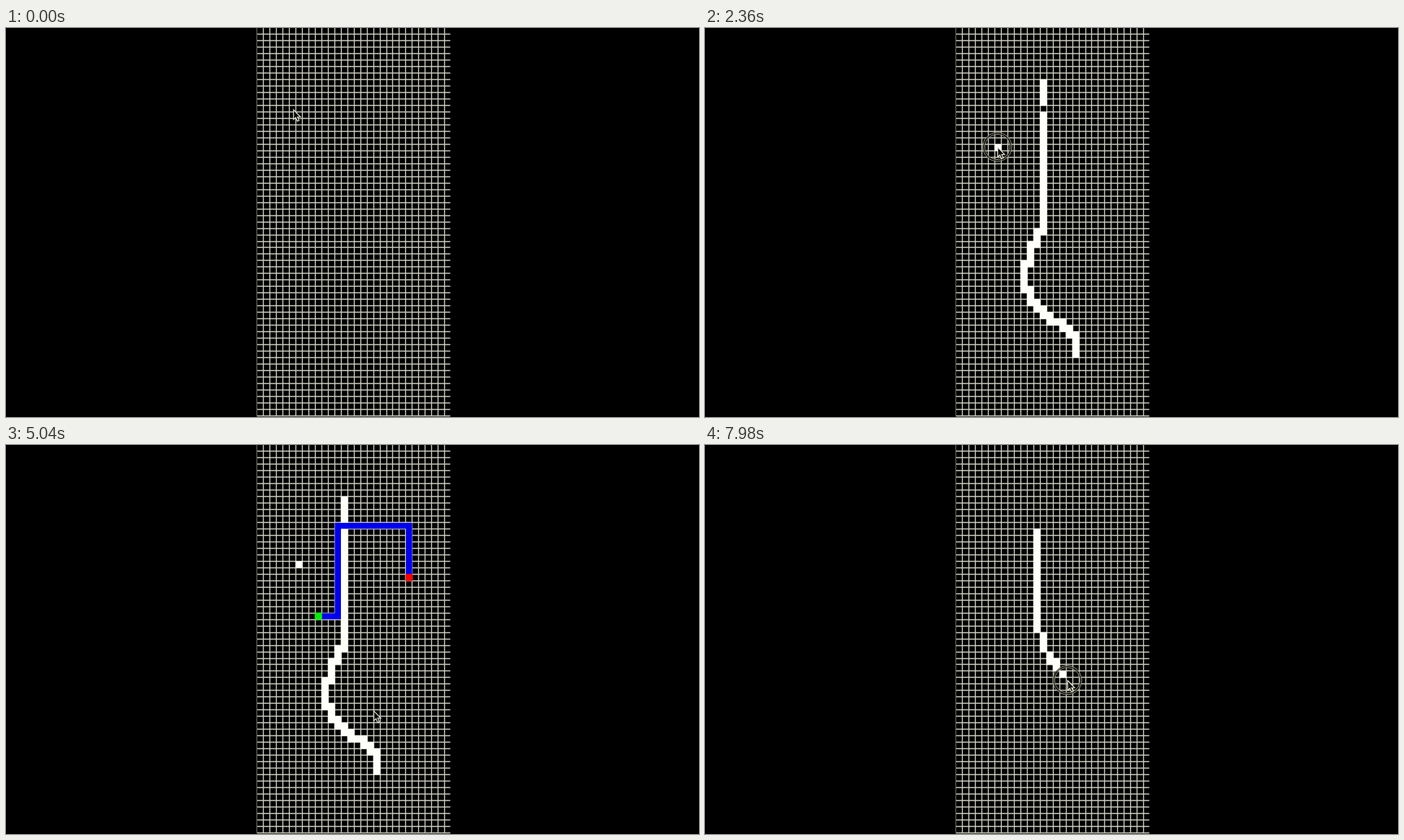
An HTML page with a canvas that plays this animation: 960x540 px, repeating every 8000 ms.

```html
<!DOCTYPE html>
<html lang="en">
<head>
<meta charset="utf-8">
<title>Grid path finder</title>
<style>
  html, body { margin: 0; width: 100%; height: 100%; overflow: hidden; background: #000; }
  canvas { display: block; width: 960px; height: 540px; }
</style>
</head>
<body>
<canvas id="stage" width="960" height="540"></canvas>
<script>
const ctx = document.getElementById('stage').getContext('2d');
const LOOP = 8000, PITCH = 8.97, LEFT = 347.6, RIGHT = 615.5, COLS = 30, ROWS = 60;
const WHITE = '#fffffa', GREEN = '#00f000', RED = '#ff0000', BLUE = '#0000f0';

// All positions below are in grid cells, all times in steps.
const STRAY_AT = 51, START_AT = 60, GOAL_AT = 77, ROUTE_AT = 88, CLEAR_AT = 145;
const CLICK = 2, INK_DELAY = 0.6;

const route = new Path2D('M10 26.5H12.5V12.5H23.5V20');
const arrow = new Path2D('M0 0V13.5L3 10.8L5.2 15.8L7.6 14.8L5.5 10H9.6Z');

const first = stroke(8.6, 32.1, `M13.5 8.3V12M13.5 13V30.9
  C12.5 32.2 10.7 36.6 10.4 38C10.5 39.5 12.6 44.2 15 45.3C17 46.2 18.5 47.3 18.5 50.9`);
const second = stroke(159, 172, 'M12.5 13.2V27.5L14 32L16 35L16.5 36.4H17.2');

const moves = [
  move(1, 8.6, 13.5, 8.3),
  first,
  move(35, 50, 6.4, 18.4),
  move(53, START_AT, 9.5, 26.4),
  move(62, 68, 16.2, 30.4),
  move(68, 76, 23.5, 20.5),
  move(81, 104, 18, 41.1),
  move(109, 127, 15.2, 33),
  move(CLEAR_AT, 159, 12.5, 13.2),
  second
];

function move(from, to, col, row) {
  return {
    from, to,
    at(k, [c, r]) {
      const ease = k * k * (3 - 2 * k);
      return [c + (col - c) * ease, r + (row - r) * ease];
    }
  };
}

// A drag along a path, with the cells it passes over in order.
function stroke(from, to, d) {
  const path = document.createElementNS('http://www.w3.org/2000/svg', 'path');
  path.setAttribute('d', d);
  const length = path.getTotalLength();
  const at = k => {
    const p = path.getPointAtLength(k * length);
    return [p.x, p.y];
  };
  const cells = new Map();
  for (let k = 0; k <= 1; k += 0.002) {
    const [col, row] = at(k).map(Math.floor);
    const key = col + ',' + row;
    if (!cells.has(key)) cells.set(key, { col, row, time: from + k * (to - from) + INK_DELAY });
  }
  return { from, to, at, cells: [...cells.values()] };
}

// Three quick steps, then a pause, in every 140 ms.
function stepAt(ms) {
  const shifted = ms + 20;
  return 3 * Math.floor(shifted / 140) + Math.min(2, Math.floor(shifted % 140 / 20));
}

function pointerAt(step) {
  let spot = [5.6, 12.6];
  for (const m of moves) {
    if (step < m.from) break;
    spot = m.at(Math.min(1, (step - m.from) / (m.to - m.from)), spot);
  }
  return spot;
}

function isPressed(step) {
  return [first, second].some(s => step >= s.from && step <= s.to + 1) ||
    [STRAY_AT, START_AT, GOAL_AT].some(t => step >= t && step < t + CLICK);
}

function drawGrid() {
  const lines = new Path2D();
  const snap = v => Math.floor(v) + 0.5;
  for (let c = 1; c < COLS; c++) {
    lines.moveTo(snap(LEFT + c * PITCH), 0);
    lines.lineTo(snap(LEFT + c * PITCH), 538.5);
  }
  for (let r = 1; r <= ROWS; r++) {
    lines.moveTo(LEFT, snap(r * PITCH));
    lines.lineTo(RIGHT, snap(r * PITCH));
  }
  ctx.strokeStyle = '#d0d0c2';
  ctx.lineWidth = 1.4;
  ctx.stroke(lines);
  ctx.fillStyle = '#70705c';
  ctx.fillRect(347, 0, 1, 539);
}

function fillCell(col, row, color) {
  ctx.fillStyle = color;
  ctx.fillRect(LEFT + col * PITCH - 0.4, row * PITCH - 0.4, PITCH + 0.8, PITCH + 0.8);
}

function drawInk(step, { cells }) {
  for (const { col, row, time } of cells) {
    if (step >= time) fillCell(col, row, WHITE);
  }
}

function drawRoute() {
  ctx.save();
  ctx.translate(LEFT, 0);
  ctx.scale(PITCH, PITCH);
  ctx.strokeStyle = BLUE;
  ctx.lineWidth = 0.94;
  ctx.stroke(route);
  ctx.restore();
}

function circle(radius, width, color) {
  ctx.beginPath();
  ctx.arc(0, 0, radius, 0, Math.PI * 2);
  ctx.lineWidth = width;
  ctx.strokeStyle = color;
  ctx.stroke();
}

function drawPointer(step) {
  const [col, row] = pointerAt(step);
  ctx.save();
  ctx.translate(LEFT + col * PITCH, row * PITCH);
  if (isPressed(step)) {
    circle(18.8, 3, 'rgba(0,0,0,.6)');
    circle(20, 1, '#a0a08c');
    circle(17.5, 1, '#a0a08c');
  }
  ctx.translate(0.5, 0.5);
  ctx.fillStyle = '#080808';
  ctx.fill(arrow);
  ctx.strokeStyle = '#e4e4d4';
  ctx.lineWidth = 1.2;
  ctx.stroke(arrow);
  ctx.restore();
}

function draw(step) {
  ctx.fillStyle = '#000';
  ctx.fillRect(0, 0, 960, 540);
  drawGrid();
  if (step < CLEAR_AT) {
    drawInk(step, first);
    if (step >= STRAY_AT) fillCell(6, 18, WHITE);
    if (step >= ROUTE_AT) drawRoute();
    if (step >= START_AT) fillCell(9, 26, GREEN);
    if (step >= GOAL_AT) fillCell(23, 20, RED);
  } else {
    drawInk(step, second);
  }
  drawPointer(step);
}

const begin = performance.now();
function tick() {
  draw(stepAt((performance.now() - begin) % LOOP));
  requestAnimationFrame(tick);
}
tick();
</script>
</body>
</html>
```
